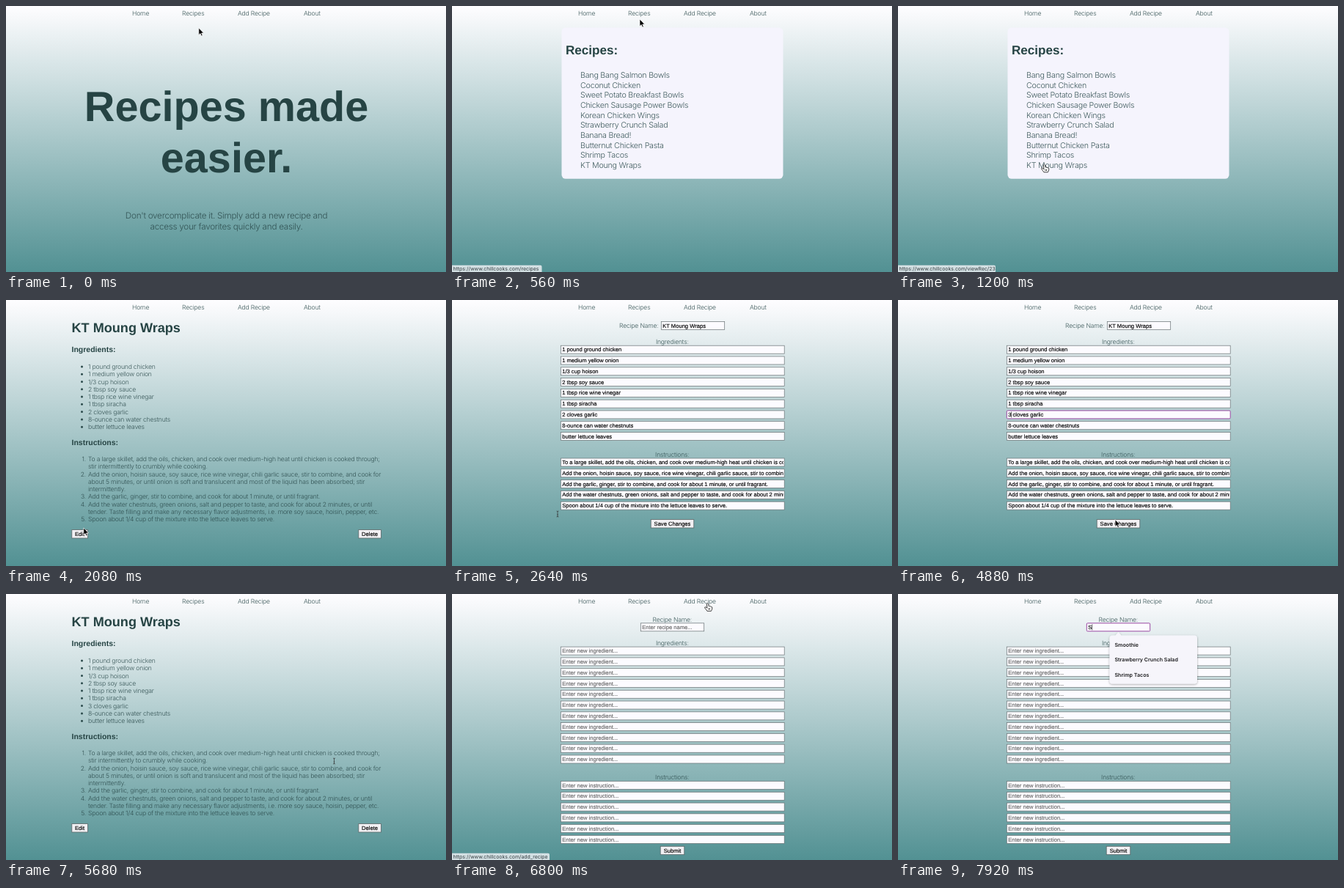
These frames come from a looping animation (600x363 px, 8 s). An HTML page:

```html
<!DOCTYPE html>
<html lang="en">
<head>
<meta charset="utf-8">
<title>Recipes</title>
<style>
  html, body { margin: 0; height: 100%; overflow: hidden; }
  svg { display: block; }
  #stage { width: 100vw; height: 100vh; }
  text { text-rendering: geometricPrecision; white-space: pre; }
  .thin { font-family: Inter, sans-serif; font-weight: 300; fill: #2b4a4b; fill-opacity: .9; letter-spacing: -.022em; }
  .bold { font-family: "Liberation Sans", Arial, sans-serif; font-weight: 700; fill: #264444; }
  .ui { font-family: "Liberation Sans", Arial, sans-serif; font-size: 7.6px; fill: #000; stroke: #000; stroke-width: .15; }
  .hint { fill: #6c6c6c; stroke: #6c6c6c; }
  .tip { font-family: Inter, sans-serif; font-size: 6.9px; fill: #333c40; }
  .pick { font-family: Inter, sans-serif; font-size: 7.1px; font-weight: 600; fill: #1c1c1e; }
  .mid { text-anchor: middle; }
  .end { text-anchor: end; }
</style>
</head>
<body>
<svg id="stage" viewBox="0 0 600 363" preserveAspectRatio="none">
  <defs>
    <linearGradient id="sky" x2="0" y2="1">
      <stop stop-color="#fefdff"/><stop offset="1" stop-color="#529193"/>
    </linearGradient>
    <filter id="soft" x="-20%" y="-20%" width="140%" height="140%">
      <feDropShadow dx="0" dy="1" stdDeviation="1.5" flood-opacity=".35"/>
    </filter>
  </defs>
  <rect width="600" height="363" fill="url(#sky)"/>
  <g id="nav"></g>
  <g id="page"></g>
  <g id="status"></g>
  <g id="cursor">
    <path id="arrow" d="M0 0V9.6L2.2 7.6L3.7 11L5.3 10.3L3.8 7H6.8Z" fill="#000" stroke="#fff" stroke-width=".7"/>
    <path id="hand" d="M-1.2 1Q0-.8 1 1L1.6 4Q2.5 3.4 3.2 4.4Q4.4 3.8 4.9 5Q6.4 4.8 6.3 6.4Q6.2 9 4.9 10.8H-.6Q-2 8.4-3.7 6.6Q-4.3 5.2-2.8 5.2L-.5 6.6Z
      M1.3 6.8V9M3 6.8V9" fill="#fff" stroke="#111" stroke-width=".8"/>
    <path id="beam" d="M-1.4-4Q0-4 0-3Q0-4 1.4-4M0-3.5V3.5M-1.4 4Q0 4 0 3Q0 4 1.4 4M-.8 1H.8" fill="none" stroke="#333" stroke-width=".7"/>
  </g>
</svg>
<script>
const $ = id => document.getElementById(id);
const LOOP = 8000, STEP = 80;
const DISH = 'KT Moung Wraps';

const recipes = ['Bang Bang Salmon Bowls', 'Coconut Chicken', 'Sweet Potato Breakfast Bowls',
  'Chicken Sausage Power Bowls', 'Korean Chicken Wings', 'Strawberry Crunch Salad', 'Banana Bread!',
  'Butternut Chicken Pasta', 'Shrimp Tacos', DISH];
const ingredients = n => ['1 pound ground chicken', '1 medium yellow onion', '1/3 cup hoison',
  '2 tbsp soy sauce', '1 tbsp rice wine vinegar', '1 tbsp siracha', n + ' cloves garlic',
  '8-ounce can water chestnuts', 'butter lettuce leaves'];
const instructions = [
  ['To a large skillet, add the oils, chicken, and cook over medium-high heat until chicken is cooked through;',
    'stir intermittently to crumbly while cooking.'],
  ['Add the onion, hoisin sauce, soy sauce, rice wine vinegar, chili garlic sauce, stir to combine, and cook for',
    'about 5 minutes, or until onion is soft and translucent and most of the liquid has been absorbed; stir',
    'intermittently.'],
  ['Add the garlic, ginger, stir to combine, and cook for about 1 minute, or until fragrant.'],
  ['Add the water chestnuts, green onions, salt and pepper to taste, and cook for about 2 minutes, or until',
    'tender. Taste filling and make any necessary flavor adjustments, i.e. more soy sauce, hoisin, pepper, etc.'],
  ['Spoon about 1/4 cup of the mixture into the lettuce leaves to serve.']];

const text = (cls, x, y, str, size) =>
  `<text class="${cls}" x="${x}" y="${y}"${size ? ` font-size="${size}"` : ''}>${str}</text>`;
const thin = (x, y, str, size = 8.6) => text('thin', x, y, str, size);
const label = (y, str) => text('thin mid', 300.3, y, str, 8.6);

// One-line input, vertically centred on cy
function field(x, cy, w, str, { hint, focus } = {}) {
  const edge = focus ? 'rx="1.2" stroke="#9a4aa3" stroke-width="1"' : 'stroke="#687174" stroke-width=".7"';
  return `<rect x="${x + .3}" y="${cy - 5.5}" width="${w - .6}" height="11" fill="#fcfbff" ${edge}/>
    <svg x="${x + 1.6}" y="${cy - 5}" width="${w - 3.2}" height="10">${text(hint ? 'ui hint' : 'ui', .6, 7.6, str)}</svg>`;
}
const fields = (y, list, opt = () => ({})) =>
  list.map((s, i) => field(148, y + 14.79 * i, 305.5, s, opt(i))).join('');
const caret = (x, cy) => `<path d="M${x} ${cy - 4}v8" stroke="#000" stroke-width=".6"/>`;
const button = (x, y, w, str) =>
  `<rect x="${x}" y="${y}" width="${w}" height="11.4" fill="#f1f0f3" stroke="#5d6668" stroke-width=".8"/>`
  + text('ui mid', x + w / 2, y + 8.4, str);

const home = () => text('bold mid', 300.5, 157, 'Recipes made', 57.6)
  + text('bold mid', 300.5, 227, 'easier.', 57.6)
  + text('thin mid', 300.5, 290, "Don't overcomplicate it. Simply add a new recipe and", 11.7)
  + text('thin mid', 300.5, 305, 'access your favorites quickly and easily.', 11.7);

const list = () => '<rect x="149.5" y="29.5" width="302" height="206.3" rx="5.5" fill="#f5f4fd"/>'
  + text('bold', 155, 65.6, 'Recipes:', 17.1)
  + recipes.map((s, i) => thin(175, 97.9 + 13.66 * i, s, 10.7)).join('');

function detail(cloves) {
  let y = 220, out = text('bold', 89.5, 43.9, DISH, 18.1)
    + text('bold', 89.5, 71.2, 'Ingredients:', 10.5) + text('bold', 89.5, 197.7, 'Instructions:', 10.5);
  ingredients(cloves).forEach((s, i) => {
    const b = 94 + 10.27 * i;
    out += `<circle cx="103.5" cy="${b - 3}" r="1.5" fill="#2b4a4b"/>` + thin(112, b, s);
  });
  instructions.forEach((lines, i) => {
    out += text('thin end', 109, y, i + 1 + '.', 8.6);
    for (const s of lines) { out += thin(112, y, s); y += 10.27; }
  });
  return out + button(89.8, 313.6, 21.6, 'Edit') + button(480.8, 313.6, 30.6, 'Delete');
}

const edit = (cloves, focus) => thin(228, 38, 'Recipe Name:') + field(285, 35, 87, DISH)
  + label(60, 'Ingredients:') + label(213.5, 'Instructions:')
  + fields(67.7, ingredients(cloves), i => ({ focus: focus && i === 6 }))
  + fields(221.5, instructions.map(l => l.join(' ')))
  + (focus ? caret(cloves ? 154.6 : 150.4, 156.4) : '')
  + button(271.2, 299.6, 58.6, 'Save Changes');

function add(focus, typed, menu) {
  const hint = () => ({ hint: true });
  let out = label(38, 'Recipe Name:') + label(70, 'Ingredients:') + label(253, 'Instructions:')
    + field(257, 45.3, 87, typed || 'Enter recipe name...', { hint: !typed, focus })
    + fields(77.6, Array(11).fill('Enter new ingredient...'), hint)
    + fields(261, Array(6).fill('Enter new instruction...'), hint)
    + button(284.2, 344.3, 32.6, 'Submit');
  if (focus) out += caret(typed ? 264.7 : 259.4, 45.3);
  if (menu) out += `<path d="M292.5 56.5H296.5L300.5 52L304.5 56.5H404Q408 56.5 408 60.5V118.5Q408 122.5 404 122.5H292.5Q288.5 122.5 288.5 118.5V60.5Q288.5 56.5 292.5 56.5Z" fill="#f6f5fb" filter="url(#soft)"/>`
    + ['Smoothie', 'Strawberry Crunch Salad', 'Shrimp Tacos']
      .map((s, i) => text('pick', 295.5, 71.7 + 20.5 * i, s)).join('');
  return out;
}

const pages = [
  [0, home()], [480, list()], [1520, detail(2)], [2240, edit('2')], [3440, edit('2', true)],
  [3680, edit('', true)], [3840, edit('3', true)], [5120, detail(3)], [6640, add()],
  [7520, add(true)], [7760, add(true, 'S')], [7840, add(true, 'S', true)]];

const links = [[0, ''], [240, 'recipes'], [800, 'viewRec/23'], [1920, ''], [6480, 'add_recipe'], [7120, '']];

// time, x, y, pointer shape until the next entry
const moves = [
  [0, 262.8, 30, 'arrow'], [240, 258, 10, 'hand'], [480, 257, 9, 'hand'], [560, 256, 18, 'arrow'],
  [800, 212, 150, 'hand'], [1120, 199.5, 216, 'hand'], [1520, 199.5, 216, 'arrow'],
  [2000, 105.8, 311, 'arrow'], [2320, 105.8, 311, 'arrow'], [2640, 144, 292, 'beam'],
  [3360, 153.2, 157.5, 'beam'], [3600, 153.2, 157.5, ''], [4160, 153.2, 157.5, 'beam'],
  [4720, 285, 290, 'arrow'], [4960, 300, 303, 'arrow'], [5120, 300, 303, 'arrow'],
  [5360, 400, 250, 'beam'], [5600, 447.5, 228, 'beam'], [5760, 447.5, 228, 'beam'],
  [6160, 390, 80, 'arrow'], [6480, 348.5, 12.5, 'hand'], [6880, 348.5, 12.5, 'hand'],
  [6960, 345, 20, 'arrow'], [7360, 302, 44, 'beam'], [7760, 300, 46, ''], [LOOP, 300, 46, '']];

const at = (track, t) => track.findLast(k => k[0] <= t);

$('nav').innerHTML = [[172, 'Home'], [240, 'Recipes'], [316, 'Add Recipe'], [406, 'About']]
  .map(([x, s]) => thin(x, 13.1, s)).join('');

function status(link) {
  if (!link) return '';
  const url = 'https://www.chillcooks.com/' + link;
  return `<path d="M0 353.8H${(url.length * 3.5 + 1.5).toFixed(1)}q2 0 2 2V363H0Z" fill="#d3e0e3"/>` + text('tip', 1.5, 361.2, url);
}

let shown, linked;
function draw(now) {
  const t = Math.floor(now % LOOP / STEP) * STEP;
  const page = at(pages, t), link = at(links, t), from = at(moves, t);
  if (page !== shown) $('page').innerHTML = (shown = page)[1];
  if (link !== linked) $('status').innerHTML = status((linked = link)[1]);

  const to = moves[moves.indexOf(from) + 1];
  const p = (t - from[0]) / (to[0] - from[0]), e = p * p * (3 - 2 * p);
  const [x, y] = [1, 2].map(i => from[i] + (to[i] - from[i]) * e);
  $('cursor').setAttribute('transform', `translate(${x} ${y})`);
  for (const s of ['arrow', 'hand', 'beam']) $(s).style.display = s === from[3] ? '' : 'none';
  requestAnimationFrame(draw);
}
draw(0);
</script>
</body>
</html>
```
